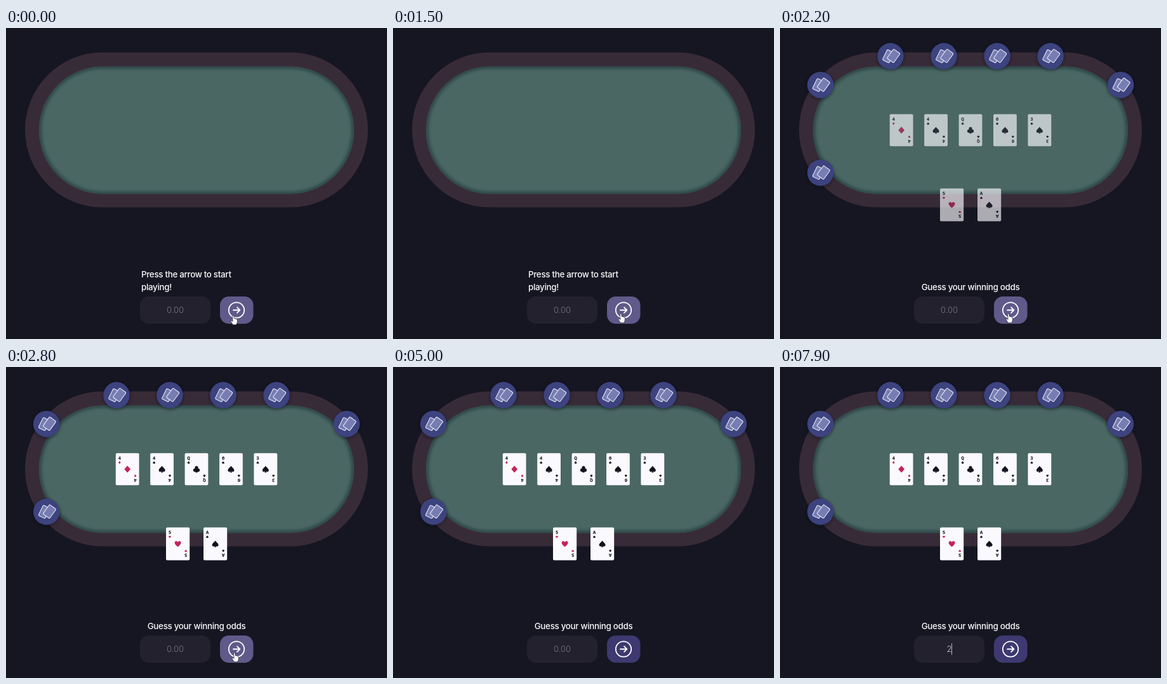
An HTML page that plays this animation: 600x490 px, repeating every 8 s.

```html
<!DOCTYPE html>
<html lang="en">
<head>
<meta charset="utf-8">
<title>Guess your odds</title>
<style>
  html, body { margin: 0; width: 100%; height: 100%; overflow: hidden; background: #161622; }
  svg { display: block; width: 100vw; height: 100vh; }
  .label { font: 500 13.4px Inter, Roboto, sans-serif; letter-spacing: -.32px; fill: #fafafd; }
  .field { font: 300 13px Inter, Roboto, sans-serif; text-anchor: middle; }
  .rank { font: 700 7.8px "Noto Sans Mono", "DejaVu Sans Mono", monospace; text-anchor: middle; }
</style>
</head>
<body>
<svg viewBox="0 0 600 490">
  <defs>
    <filter id="blur" x="-10%" y="-10%" width="120%" height="120%"><feGaussianBlur stdDeviation="2.2"/></filter>
    <clipPath id="felt"><rect x="52" y="60.5" width="496" height="201" rx="100.5"/></clipPath>
    <path id="diamond" d="M0-5.6L4.9 0 0 5.6-4.9 0Z"/>
    <path id="heart" d="M0 4.8C-2-3+5-3+5-3L0 4.8Z"/>
    <path id="spade" d="M0-5.2C1.2-3 5-.8 5 1.7 5 4.4 2 4.7.7 3.1L1.7 5.2H-1.7L-.7 3.1C-2 4.7-5 4.4-5 1.7-5-.8-1.2-3 0-5.2Z"/>
    <g id="club">
      <circle cy="-2.4" r="2.6"/><circle cx="-2.5" cy="1.4" r="2.6"/><circle cx="2.5" cy="1.4" r="2.6"/>
      <path d="M-.7-1H.7L1.8 5.2H-1.8Z"/>
    </g>
    <g id="seat">
      <circle cy="1.5" r="21.5" fill="#0c0c18" opacity=".4" filter="url(#blur)"/>
      <circle r="20.7" fill="#3c437f"/>
      <g fill="#777db2" stroke="#e6e7f5" stroke-width="1.1">
        <rect x="-5.8" y="-9" width="11.6" height="18" rx="1.6" transform="translate(-3.6 .2) rotate(26)"/>
        <rect x="-6.4" y="-9" width="12.8" height="18" rx="1.6" transform="translate(4.8 -.3) rotate(36)"/>
      </g>
    </g>
  </defs>

  <rect width="600" height="490" fill="#161622"/>
  <rect x="30" y="38.5" width="540" height="244" rx="122" fill="#382b38"/>
  <g clip-path="url(#felt)">
    <rect x="52" y="60.5" width="496" height="201" fill="#4a6763"/>
    <rect x="52" y="60.5" width="496" height="201" rx="100.5" fill="none" stroke="#2f4848" stroke-width="8" filter="url(#blur)"/>
  </g>

  <g id="seats"></g>
  <g id="cards"></g>

  <g id="intro" class="label">
    <text x="213" y="392.5">Press the arrow to start</text>
    <text x="213" y="412.5">playing!</text>
  </g>
  <text id="prompt" class="label" x="300" y="412.5" text-anchor="middle">Guess your winning odds</text>

  <rect x="211" y="423" width="111" height="43" rx="14" fill="#22212d"/>
  <text id="value" class="field" x="266.5" y="449.2"></text>
  <path id="caret" d="M0 435.5V453.5" stroke="#b9b8c4"/>

  <rect id="button" x="337" y="423" width="52.5" height="43" rx="14"/>
  <g fill="none" stroke="#fff" stroke-width="1.8" stroke-linecap="round" stroke-linejoin="round">
    <circle cx="363" cy="444.5" r="12.2"/>
    <path d="M358 444.5H368.2M364 440.2L368.3 444.5 364 448.8"/>
  </g>
  <path id="hand" fill="#fff" stroke="#26243a" stroke-width=".7" stroke-linejoin="round"
    d="M-2.6-6.3Q-1.5-7.6-.4-6.3L.3-2.2Q1.4-3 2.2-1.8 3.4-2.4 4-1.1 5.2-1.4 5.4 0L5.2 4 3.6 7.6H-1.6L-4.8 2.6Q-5.3.8-3.6 1L-1.9 2.4Z"/>
</svg>
<script>
const LOOP = 8000, STEP = 100;
const DEAL = 1960, LEAVE = 4600, FOCUS = 6000, TYPE = 7700;
const $ = id => document.getElementById(id);
const clamp = v => Math.max(0, Math.min(1, v));
const progress = (t, from, to) => clamp((t - from) / (to - from));
const mix = (a, b, p) => a + (b - a) * p;
const show = (el, on) => el.setAttribute('visibility', on ? 'visible' : 'hidden');
const move = (el, x, y) => el.setAttribute('transform', `translate(${x} ${y})`);

$('heart').setAttribute('d', 'M0 4.8C-2 3-5 .9-5-1.6-5-4.8-1.3-5.1 0-2.5 1.3-5.1 5-4.8 5-1.6 5 .9 2 3 0 4.8Z');

const seats = [[174, 44.3], [258, 44.3], [342, 44.3], [426, 44.3], [63.7, 89.7], [536.4, 89.7], [63.7, 228]];
$('seats').innerHTML = seats.map(([x, y]) => `<use href="#seat" x="${x}" y="${y}"/>`).join('');

function cardMarkup(rank, suit, w, h) {
  const color = suit === 'heart' || suit === 'diamond' ? '#c3245b' : '#12121e';
  const corner = `<text class="rank" x="6" y="10.6" fill="#12121e">${rank}</text>
    <use href="#${suit}" transform="translate(6 14.7) scale(.38)"/>`;
  return `<g fill="${color}"><rect width="${w}" height="${h}" rx="2" fill="#faf9fd"/>${corner}
    <g transform="rotate(180 ${w / 2} ${h / 2})">${corner}</g>
    <use href="#${suit}" x="${w / 2}" y="${h / 2}"/></g>`;
}

function addCard(rank, suit, w, h, x, y, startX = x) {
  const el = document.createElementNS('http://www.w3.org/2000/svg', 'g');
  el.innerHTML = cardMarkup(rank, suit, w, h);
  $('cards').append(el);
  return { el, x, y, startX };
}

const board = [['4', 'diamond'], ['4', 'spade'], ['Q', 'club'], ['6', 'spade'], ['3', 'spade']];
const cards = [
  ...board.map(([rank, suit], i) => addCard(rank, suit, 36.8, 50.4, 172.8 + 54.4 * i, 135.8)),
  addCard('5', 'heart', 37.2, 51.6, 252, 252.8, 271),
  addCard('A', 'spade', 37.2, 51.6, 311, 252.8, 271)
];

function render(t) {
  const dealt = t >= DEAL;
  show($('intro'), !dealt);
  show($('prompt'), dealt);
  show($('seats'), dealt);

  const fade = progress(t, DEAL, DEAL + 365);
  const slide = 1 - (1 - progress(t, 2000, 2200)) ** 2;
  for (const { el, x, y, startX } of cards) {
    el.setAttribute('opacity', fade);
    move(el, mix(startX, x, slide), y);
  }

  const lift = progress(t, 1100, 1400);
  const away = progress(t, LEAVE - 100, LEAVE + 100);
  move($('hand'), 359 + lift + progress(t, 1700, 1900) - 30 * away, 460 - 3 * lift);
  show($('hand'), t < LEAVE);
  const cool = progress(t, LEAVE - 100, LEAVE + 200);
  const rgb = [[95, 62], [90, 57], [137, 112]].map(([a, b]) => Math.round(mix(a, b, cool)));
  $('button').setAttribute('fill', `rgb(${rgb})`);

  const typed = t >= TYPE;
  $('value').textContent = typed ? '2' : '0.00';
  $('value').setAttribute('fill', typed ? '#c4c3ce' : '#777681');
  const blink = (t - (typed ? TYPE : FOCUS)) % 1000 < 500;
  show($('caret'), t >= FOCUS && blink);
  move($('caret'), typed ? 270.5 : 266.5, 0);
}

const start = performance.now();
function tick() {
  const t = (performance.now() - start) % LOOP;
  render(Math.floor(t / STEP) * STEP);
  requestAnimationFrame(tick);
}
render(0);
requestAnimationFrame(tick);
</script>
</body>
</html>
```
